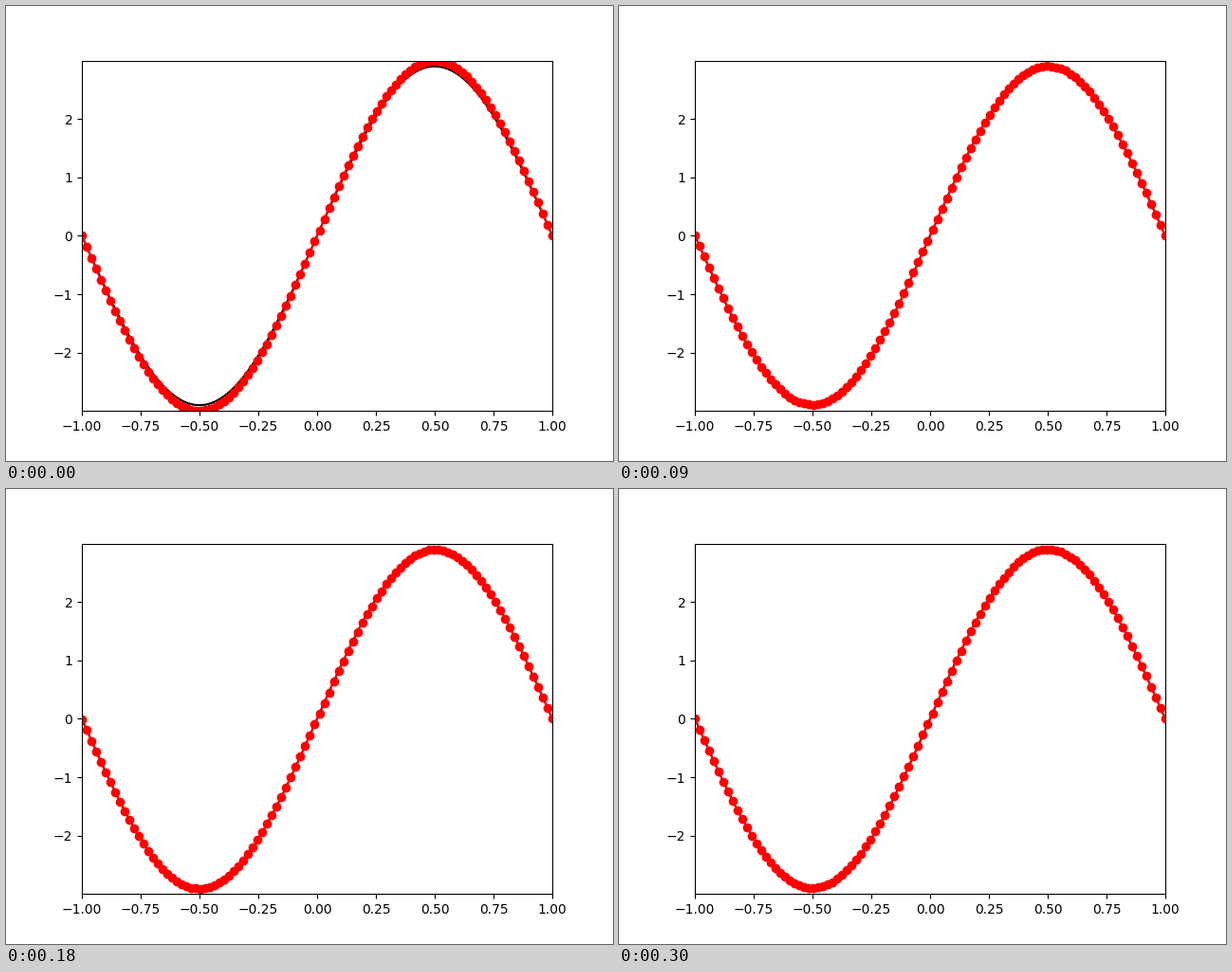
Animation of 640 by 480 pixels, one loop 0.33 s. Source, as a matplotlib script:

```python
import numpy as np
import matplotlib.pyplot as plt
from matplotlib.animation import FuncAnimation

FRAMES, INTERVAL = 11, 30
AMP, LIMIT = 2.9, 2.998

x = np.linspace(-1, 1, 100)
wave = np.sin(np.pi * x)
tilt = np.cos(np.pi / 4 * (x + 1))  # 1 at the left end, 0 at the right


def error(step):
    """Overshoot at the start, then a damped swing of the left side."""
    if step == 0:
        return 0.095 * wave
    swing = np.cos(2 * np.pi * (step - 1) / FRAMES) / step**1.3
    return 0.1 * swing * tilt


fig, ax = plt.subplots(figsize=(6.4, 4.8), dpi=100)
ax.set_xlim(-1, 1)
ax.set_ylim(-LIMIT, LIMIT)
ax.plot(x, AMP * wave, "k-")
fit, = ax.plot(x, AMP * wave, "ro-")


def update(step):
    fit.set_ydata(AMP * wave + error(step))
    return fit,


anim = FuncAnimation(fig, update, frames=FRAMES, interval=INTERVAL,
                     repeat=True, repeat_delay=0)
plt.show()
```
